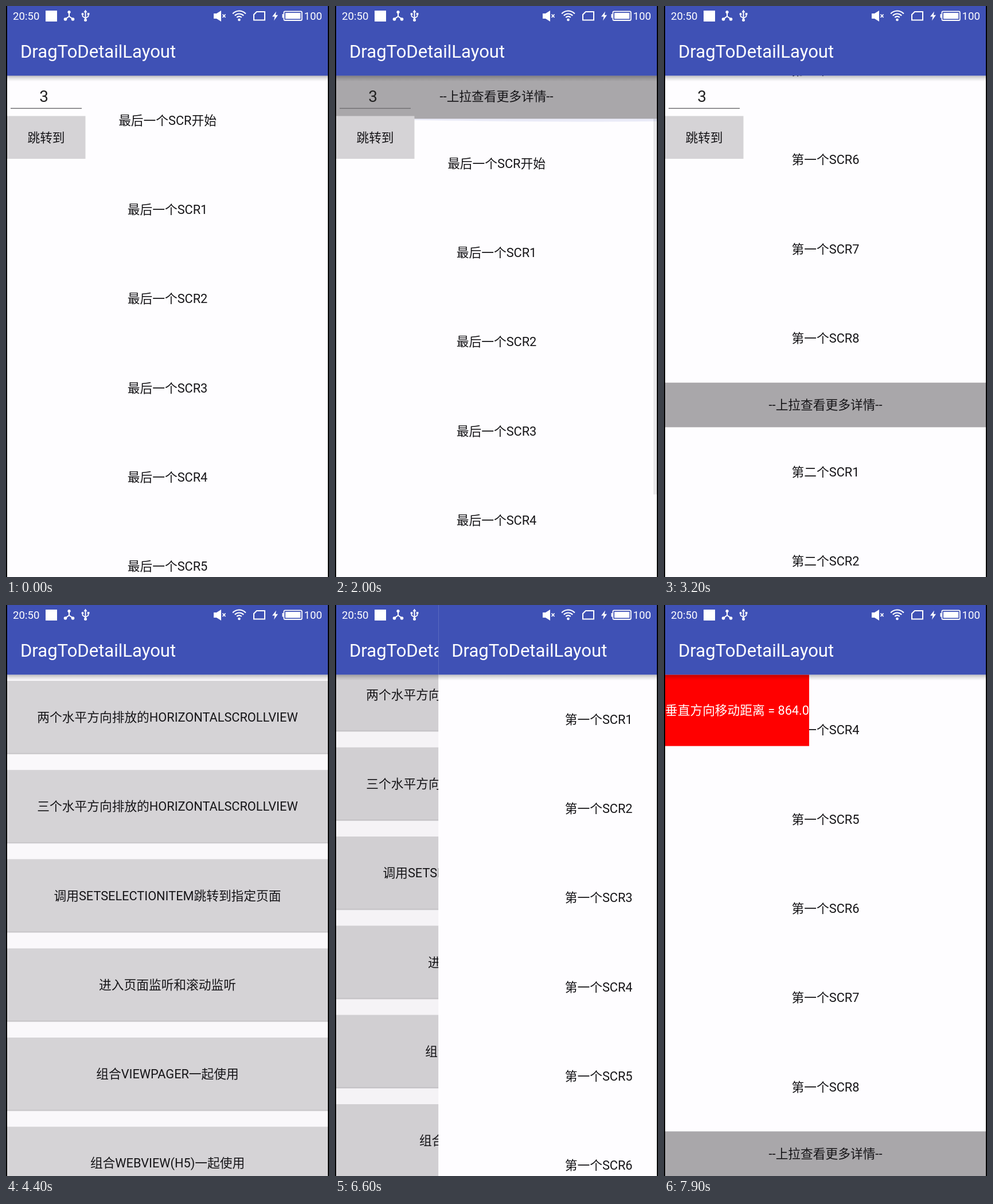
Animation of 563 by 994 pixels, one loop 8000 ms. Source, as an HTML page with a canvas:

```html
<!DOCTYPE html>
<html lang="zh">
<head>
<meta charset="utf-8">
<title>DragToDetailLayout</title>
<style>
html, body { margin: 0; width: 100%; height: 100%; overflow: hidden; background: #000; }
canvas { display: block; }
</style>
</head>
<body>
<canvas id="stage" width="563" height="994"></canvas>
<script>
const ctx = document.getElementById('stage').getContext('2d');
const LOOP = 8000, STEP = 100;
const LEFT = 2, WIDTH = 559, TOP = 121.3, BOTTOM = 994, VIEW = BOTTOM - TOP;
const PX = 1080 / WIDTH;              // device pixels per stage pixel
const ROW = 300 / PX, BAR = 150 / PX;
const SIZE = 42 / PX, MID = 281.5;
const INK = '#151417', BLUE = '#3f51b5', GREY = '#d5d3d6';
const LATIN = 'Roboto, sans-serif';
const HAN = '"Noto Sans CJK SC", "Noto Sans CJK", sans-serif';

// ---- time ----
const out = p => u => 1 - (1 - u) ** p;
const smooth = u => u * u * (3 - 2 * u);
const speedUp = u => u ** 1.4;
const line = u => u;

// keys: [time, value, easing towards this key]
function track(t, keys) {
  if (t <= keys[0][0]) return keys[0][1];
  for (let i = 1; i < keys.length; i++) {
    const [t0, v0] = keys[i - 1], [t1, v1, ease = smooth] = keys[i];
    if (t <= t1) return v0 + (v1 - v0) * ease((t - t0) / (t1 - t0));
  }
  return keys[keys.length - 1][1];
}

// ---- drawing helpers ----
function rect(x, y, w, h, color) {
  ctx.fillStyle = color;
  ctx.fillRect(x, y, w, h);
}

function label(s, x, y, font, color = '#fff', align = 'left') {
  ctx.font = font;
  ctx.fillStyle = color;
  ctx.textAlign = align;
  ctx.fillText(s, x, y);
}

// Chinese and Latin runs side by side; returns the total width
function mixed(s, x, y, { color = INK, weight = 500, centre = true, paint = true } = {}) {
  const runs = s.match(/[\u4e00-\u9fff]+|[^\u4e00-\u9fff]+/g).map(text => {
    const font = /[\u4e00-\u9fff]/.test(text)
      ? `${weight} ${SIZE}px ${HAN}` : `400 ${SIZE}px ${LATIN}`;
    ctx.font = font;
    return { text, font, w: ctx.measureText(text).width };
  });
  const total = runs.reduce((sum, r) => sum + r.w, 0);
  if (centre) x -= total / 2;
  if (paint) for (const r of runs) {
    label(r.text, x, y + 7.8, r.font, color);
    x += r.w;
  }
  return total;
}

function shape(points, fill = true, width = 2) {
  ctx.beginPath();
  points.forEach(([x, y], i) => i ? ctx.lineTo(x, y) : ctx.moveTo(x, y));
  if (fill) ctx.fill();
  else { ctx.lineWidth = width; ctx.stroke(); }
}

function dot(x, y, r) {
  ctx.beginPath();
  ctx.arc(x, y, r, 0, 7);
  ctx.fill();
}

function glow(y, height, alpha) {
  if (alpha <= 0) return;
  ctx.fillStyle = `rgba(63,81,181,${alpha})`;
  ctx.beginPath();
  ctx.moveTo(LEFT, y);
  ctx.quadraticCurveTo(370, y + height * 2, LEFT + WIDTH, y + height * 1.3);
  ctx.lineTo(LEFT + WIDTH, y);
  ctx.fill();
}

function thumb(y, h, alpha) {
  if (alpha > 0) rect(555, y, 6, h, `rgba(0,0,0,${alpha})`);
}

// ---- content ----
const rows = (name, keys) => keys.map(k => name + 'SCR' + k);
const MORE = '--上拉查看更多详情--';
const upTo8 = [1, 2, 3, 4, 5, 6, 7, 8];
const strip = [
  ...rows('第一个', upTo8), MORE,
  ...rows('第二个', upTo8), MORE,
  ...rows('最后一个', ['开始', 1, 2, 3, 4, 5, 6])
];
const PAGE = 8 * ROW + BAR, LAST = 2 * PAGE;

const buttons = [
  '两个水平方向排放的HORIZONTALSCROLLVIEW',
  '三个水平方向排放的HORIZONTALSCROLLVIEW',
  '调用SETSELECTIONITEM跳转到指定页面',
  '进入页面监听和滚动监听',
  '组合VIEWPAGER一起使用',
  '组合WEBVIEW(H5)一起使用'
];

function drawStrip(pos) {
  let y = TOP - pos;
  for (const s of strip) {
    const h = s === MORE ? BAR : ROW;
    if (y + h > TOP && y < BOTTOM) {
      if (s === MORE) rect(LEFT, y, WIDTH, h, '#a9a7aa');
      mixed(s, MID, y + h / 2);
    }
    y += h;
  }
}

function jumpScreen(t) {
  const pos = track(t, [
    [400, LAST], [800, LAST + 200], [900, LAST + 200], [1500, LAST, out(2)],
    [1800, LAST], [2000, LAST - 75, line], [2400, LAST - VIEW, out(2)],
    [2700, PAGE], [3200, PAGE - 612, speedUp], [3400, PAGE - VIEW, out(2)]
  ]);
  drawStrip(pos);
  const top = TOP + LAST - pos;
  if (t >= 500 && t < 2200) {
    const inner = Math.max(0, pos - LAST);
    thumb(Math.max(top, TOP) + inner * 0.75, 654, track(t, [[1700, .28], [2100, .02, line]]));
    if (t >= 1500) glow(top, 3.5, track(t, [[1500, .2], [2000, .1], [2200, 0]]));
  }
  label('3', 66, 166.5, `400 ${54 / PX}px ${LATIN}`, '#222', 'center');
  rect(8, 177.5, 124, 1.5, '#747376');
  rect(LEFT, 191.5, 136.5, 74.5, GREY);
  mixed('跳转到', 70, 229);
}

function menuScreen(t) {
  rect(LEFT, TOP, WIDTH, VIEW, '#faf8fb');
  const pos = track(t, [[4900, 0], [5400, 39.4]]);
  buttons.forEach((s, i) => {
    const y = 132 + i * ROW - pos;
    rect(LEFT, y, WIDTH, 128.2, '#e4e2e5');
    rect(LEFT, y + 125, WIDTH, 2.2, '#c3c1c4');
    rect(LEFT, y, WIDTH, 125.8, GREY);
    mixed(s, MID, y + 63.3);
  });
  if (t >= 5000 && t < 6100) {
    thumb(365 - (39.4 - pos) * .72, 629, track(t, [[5800, .28], [6100, 0, line]]));
    glow(BOTTOM, -9, track(t, [[5300, 0], [5500, .14], [5600, .14], [5900, 0]]));
  }
  if (t >= 6600) rect(LEFT, TOP, WIDTH, VIEW, 'rgba(0,0,0,.02)');
}

function distanceScreen(t) {
  const pos = track(t, [[7100, 0], [7900, PAGE - VIEW]]);
  drawStrip(pos);
  if (t < 7200) return;
  const s = `垂直方向移动距离 = ${Math.round(pos * PX)}.0`;
  const w = mixed(s, 0, 0, { weight: 400, centre: false, paint: false });
  rect(LEFT, TOP, w, 240 / PX, '#f00');
  mixed(s, LEFT, 183.5, { color: '#fff', weight: 400, centre: false });
}

// ---- screen frame ----
function screen(x, body, t) {
  ctx.save();
  ctx.beginPath();
  ctx.rect(LEFT, 0, WIDTH, BOTTOM);
  ctx.clip();
  ctx.translate(x, 0);
  rect(LEFT, 0, WIDTH, BOTTOM, '#fefdff');
  body(t);
  const shade = ctx.createLinearGradient(0, TOP, 0, TOP + 10);
  shade.addColorStop(0, 'rgba(0,0,0,.25)');
  shade.addColorStop(.5, 'rgba(0,0,0,.1)');
  shade.addColorStop(1, 'rgba(0,0,0,0)');
  rect(LEFT, TOP, WIDTH, 10, shade);
  rect(LEFT, 0, WIDTH, TOP, BLUE);
  label('DragToDetailLayout', 25, 89.5, `400 ${60 / PX}px ${LATIN}`);
  ctx.restore();
}

function statusBar() {
  const font = `400 ${36 / PX}px ${LATIN}`;
  label('20:50', 12, 24, font);
  label('100', 519.5, 24, font);
  ctx.fillStyle = ctx.strokeStyle = '#fff';
  ctx.fillRect(69, 8, 20, 19);

  // three linked nodes
  shape([[110, 10], [110, 18], [103, 23]], false);
  shape([[110, 18], [117, 23]], false);
  dot(110, 10.5, 2.6); dot(103.5, 23, 2.8); dot(116.5, 23, 2.8);

  // usb
  shape([[138.5, 9], [138.5, 25]], false);
  shape([[135.5, 11], [138.5, 6.5], [141.5, 11]]);
  shape([[133.5, 14], [133.5, 18], [138.5, 21.5], [143.5, 18], [143.5, 14]], false, 1.6);
  dot(133.5, 14, 2); dot(138.5, 24.5, 2.5);
  ctx.fillRect(141.8, 12, 3.6, 3.6);

  // muted speaker
  shape([[362, 13], [367, 13], [375, 8], [375, 27], [367, 22], [362, 22]]);
  shape([[377.5, 14.5], [382.5, 20]], false, 1.7);
  shape([[382.5, 14.5], [377.5, 20]], false, 1.7);

  // wifi
  ctx.lineWidth = 2.2;
  for (const r of [15.5, 10.5, 5.8]) {
    ctx.beginPath();
    ctx.arc(406.5, 24, r, -Math.PI * .76, -Math.PI * .24);
    ctx.stroke();
  }
  dot(406.5, 24, 2.3);

  // sim, bolt, battery
  shape([[437, 10], [451, 10], [451, 24.5], [432, 24.5], [432, 15], [437, 10], [438, 10]], false);
  shape([[471, 9.5], [464, 18.5], [468.5, 18.5], [467, 25.5], [474, 15.8], [469.8, 15.8]]);
  ctx.lineWidth = 1.8;
  ctx.beginPath();
  ctx.roundRect(484.4, 9.4, 31.4, 15.6, 2);
  ctx.stroke();
  ctx.fillRect(481.5, 14, 2.5, 6.5);
  ctx.fillRect(487, 12, 26.3, 10.4);
}

function draw(t) {
  rect(0, 0, 563, 994, '#000');
  if (t < 4200) screen(0, jumpScreen, t);
  else if (t < 6800) {
    screen(0, menuScreen, t);
    if (t < 4400) screen(track(t, [[4100, 0], [4400, WIDTH, out(2.82)]]), jumpScreen, t);
    if (t >= 6600) screen(track(t, [[6500, WIDTH], [6800, 0, out(2.82)]]), distanceScreen, t);
  } else screen(0, distanceScreen, t);
  statusBar();
}

function tick(now) {
  draw(Math.floor(now % LOOP / STEP) * STEP);
  requestAnimationFrame(tick);
}
requestAnimationFrame(tick);
</script>
</body>
</html>
```
